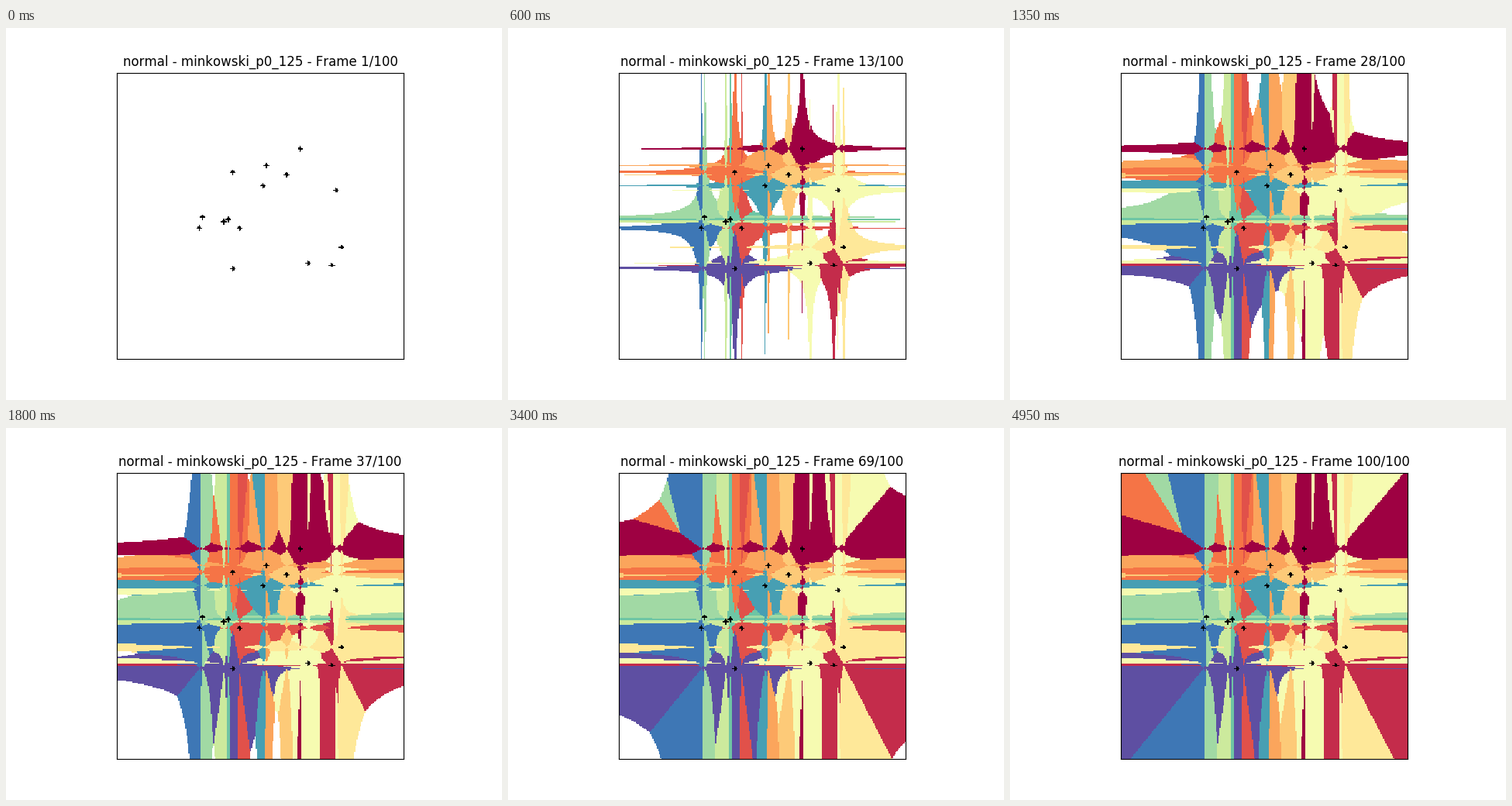
These frames come from a looping animation (640 by 480 pixels, 5000 ms). A matplotlib script:

```python
import numpy as np
import matplotlib.pyplot as plt
from matplotlib.animation import FuncAnimation

W, H, DPI = 640, 480, 100
FRAMES, INTERVAL = 100, 50
P = 0.125
N = 256             # cells along each side of the grid
MERGED = (246, 251, 177)

# Grid cells that hold a site, in colour map order
SITE_CELLS = np.array([
    (163, 187), (191, 83), (109, 116), (103, 166), (133, 172),
    (151, 164), (200, 99), (170, 85), (195, 150), (95, 122),
    (76, 126), (99, 124), (130, 154), (73, 116), (103, 80),
])


def nearest_site(sites):
    """Minkowski distance to the nearest site, and its index, per cell."""
    axis = np.arange(N)
    dx, dy = (np.abs(axis - sites[:, k, None]) ** P for k in (0, 1))
    total = dy[:, :, None] + dx[:, None, :]
    return total.min(axis=0) ** (1 / P), total.argmin(axis=0)


def site_colors(count):
    colors = plt.get_cmap("Spectral")(np.linspace(0, 1, count), bytes=True)
    colors = colors[:, :3].copy()
    mid = count // 2
    colors[mid:mid + 2] = MERGED    # the two palest tones read as one
    return colors


# Sites sit a little off the cell centres, more so to the right and top
sites = SITE_CELLS + 0.25 + 0.15 * SITE_CELLS / N
dist, label = nearest_site(sites)
radii = dist.max() * np.arange(1, FRAMES + 1) / FRAMES

cells = site_colors(len(sites))[label]
cells[dist <= radii[0]] = 0         # the smallest balls mark the sites

plt.rcParams["text.kerning_factor"] = 6
fig, ax = plt.subplots(figsize=(W / DPI, H / DPI), dpi=DPI, facecolor="white")
picture = ax.imshow(np.full_like(cells, 255), origin="lower",
                    interpolation="nearest")
ax.set(xticks=[], yticks=[])
title = ax.set_title("", fontsize=12, family="DejaVu Sans", pad=6.72)


def update(i):
    shown = dist <= radii[i]
    picture.set_data(np.where(shown[..., None], cells, 255).astype(np.uint8))
    title.set_text(f"normal - minkowski_p0_125 - Frame {i + 1}/{FRAMES}")
    return picture, title


anim = FuncAnimation(fig, update, frames=FRAMES, interval=INTERVAL,
                     repeat=True, repeat_delay=0)
plt.show()
```
